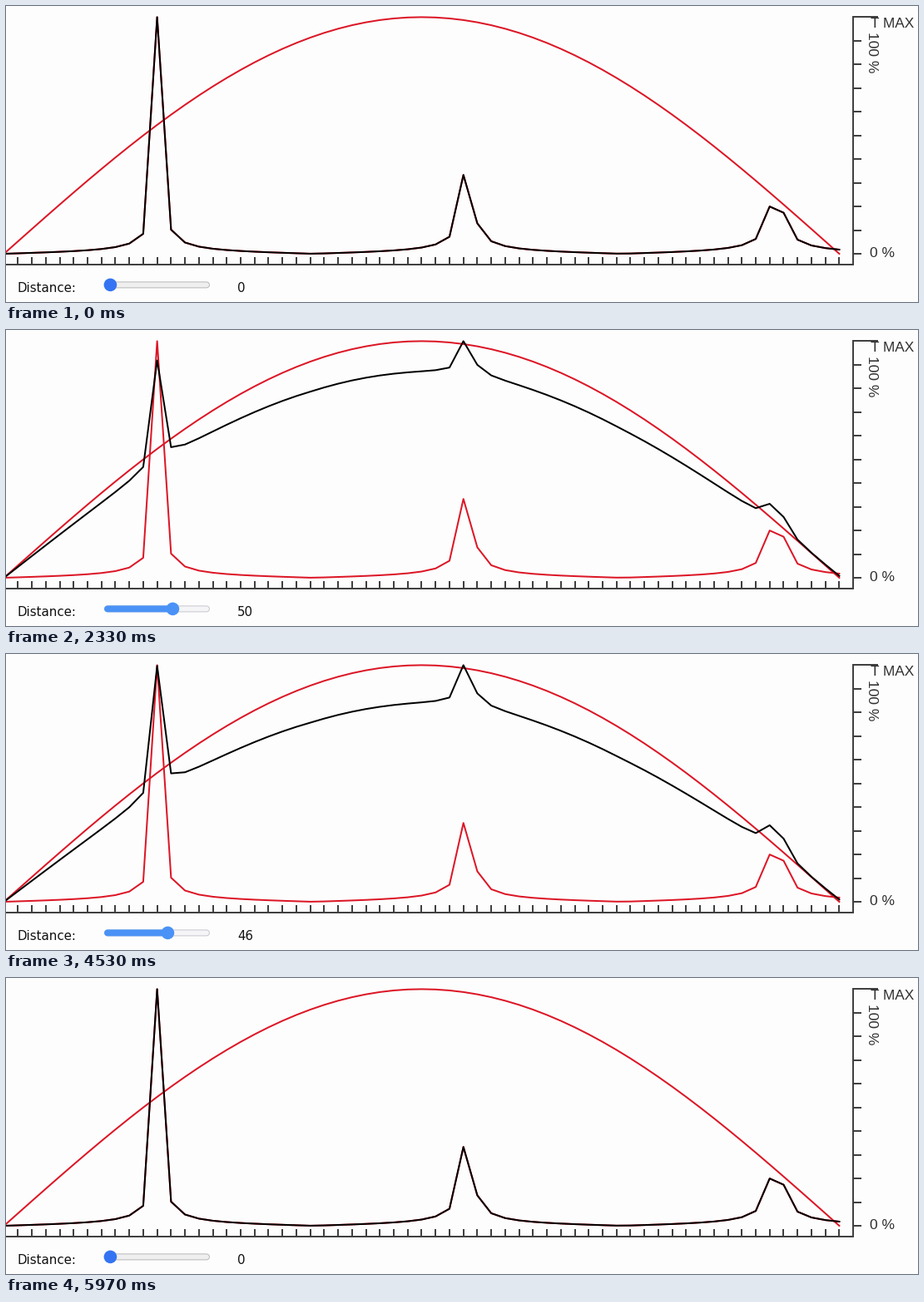
Animation of 1096 by 356 pixels, one loop 7.6 s. Source, as a matplotlib script:

```python
import numpy as np
import matplotlib.pyplot as plt
from matplotlib.animation import FuncAnimation
from matplotlib.collections import LineCollection

W, H, DPI = 1096, 356, 100
PX = 72 / DPI                      # points per pixel
LOOP_MS, STEP_MS = 7600, 20

PAPER, AXIS, INK, RED = "#fdfdfd", "#404040", "#303030", "#dc1626"
ZERO_Y, FULL_Y = 298, 13.4         # 0 % and 100 % levels
TICK_GAP, LAST_X, BINS = 16.73, 1001.4, 60
VALUE_MAX, ARCH_GAIN = 75, 0.957
KNOB_X, KNOB_Y, KNOB_STEP = 125.4, 335.4, 1.5

# (thumb, track, track border) for each pointer state
IDLE = ("#3474f2", "#efefef", "#b8b8b8")
HOVER = ("#2862cc", "#e5e5e5", "#a8a8a8")
ACTIVE = ("#4a92f6", "#f5f5f7", "#c6c6d0")

# slider value over time: ms, value
DRAG = np.array([
    (1070, 0), (1400, 5), (1460, 5), (2320, 50), (2360, 50), (2730, 75),
    (3780, 75), (4060, 64), (4120, 64), (4520, 46), (4590, 46),
    (5220, 10), (5290, 10), (5560, 1), (5820, 1), (5830, 0),
])

bins = np.arange(BINS + 1)
xs = LAST_X - TICK_GAP * (BINS - bins)
comb = np.abs(np.tan(np.pi * bins / (2 * 11.093)))   # odd harmonics with leakage
comb /= comb.max()
arch = np.sin(np.pi * bins / BINS)


def to_y(level):
    return ZERO_Y + (FULL_Y - ZERO_Y) * level


def mix(value):
    curve = (VALUE_MAX - value) * comb + ARCH_GAIN * value * arch
    return curve / curve.max()


def slider_value(ms):
    return int(round(np.interp(ms, DRAG[:, 0], DRAG[:, 1])))


def slider_state(ms):
    if 820 <= ms < 5960:
        return ACTIVE
    return HOVER if 660 <= ms < 820 else IDLE


fig = plt.figure(figsize=(W / DPI, H / DPI), dpi=DPI, facecolor=PAPER)
ax = fig.add_axes([0, 0, 1, 1])
ax.set_xlim(0, W)
ax.set_ylim(H, 0)
ax.axis("off")


def label(x, y, text, size, font, color=INK, **kw):
    return ax.text(x, y, text, fontsize=size * PX, family=font, color=color,
                   ha="left", va="baseline", rotation_mode="anchor", **kw)


def line(x, y, color, width=2, **kw):
    return ax.plot(x, y, color=color, lw=width * PX, **kw)[0]


# axes and ticks
rules = [[(0, 311), (1019, 311)], [(1018, 12), (1018, 312)],
         [(1018, 13), (1048, 13)]]
rules += [[(x, 302), (x, 311)] for x in xs[1:]]
rules += [[(1018, y), (1028, y)] for y in to_y(np.arange(10) / 10)]
ax.add_collection(LineCollection(rules, colors=AXIS, linewidths=2 * PX,
                                 snap=True))

label(1039, 26, "T MAX", 17.3, "Liberation Sans")
label(1036.5, 31, "100 %", 17.5, "Liberation Sans", rotation=270)
label(1037.5, 302, "0 %", 17.5, "Liberation Sans")
label(13.5, 344, "Distance:", 15, "DejaVu Sans", "#101010")
counter = label(278, 344, "0", 15, "DejaVu Sans", "#101010")

# curves
line(xs, to_y(comb), RED, zorder=3)
line(xs, to_y(arch), RED, zorder=3)
blend = line(xs, to_y(comb), "black", zorder=4)

# slider
bar = dict(solid_capstyle="round", snap=False)
ends, level = [122, 241], [KNOB_Y] * 2
border = line(ends, level, IDLE[2], 8, zorder=5, **bar)
track = line(ends, level, IDLE[1], 6, zorder=6, **bar)
filled = line([ends[0], KNOB_X], level, IDLE[0], 8, zorder=7, **bar)
knob = plt.Circle((KNOB_X, KNOB_Y), 7.8, lw=0, fc=IDLE[0], zorder=8)
ax.add_patch(knob)


def draw(frame):
    ms = frame * STEP_MS
    value = slider_value(ms)
    thumb, groove, edge = slider_state(ms)
    x = KNOB_X + KNOB_STEP * value

    blend.set_ydata(to_y(mix(value)))
    counter.set_text(str(value))
    border.set_color(edge)
    track.set_color(groove)
    filled.set_color(thumb)
    filled.set_xdata([ends[0], x])
    knob.center = (x, KNOB_Y)
    knob.set_facecolor(thumb)
    return blend, counter, border, track, filled, knob


anim = FuncAnimation(fig, draw, frames=LOOP_MS // STEP_MS, interval=STEP_MS,
                     repeat=True, repeat_delay=0)
plt.show()
```
